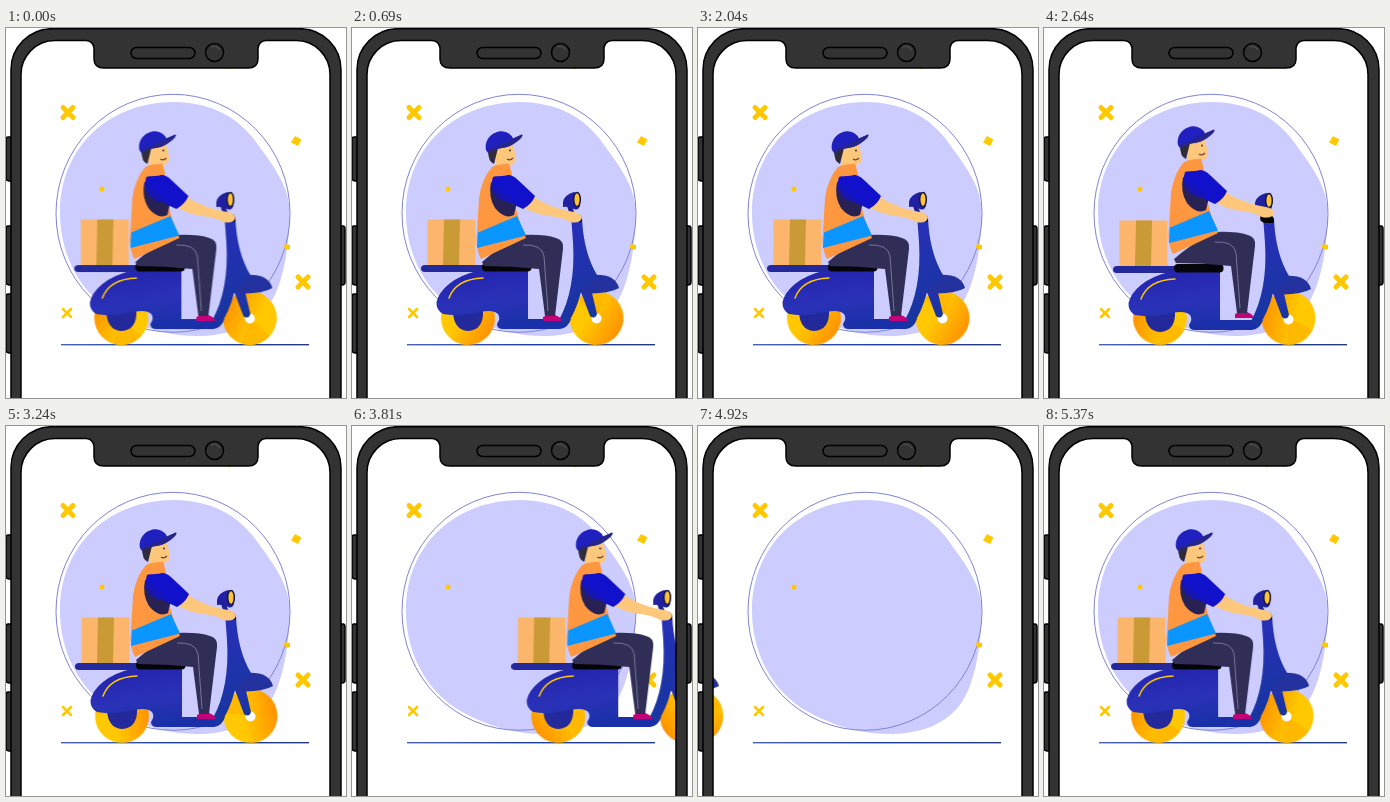
Write an HTML page that moves like this. It is 340 px wide and 370 px high and loops after 5400 ms.

```html
<!DOCTYPE html>
<html lang="en">
<head>
<meta charset="utf-8">
<title>Scooter delivery</title>
<style>
html, body { margin: 0; width: 100%; height: 100%; overflow: hidden; background: #fff; }
svg { display: block; width: 100vw; height: 100vh; }
#scooter { animation: drive 5400ms infinite; }
#bike { --hop: 1px; }
#rider { --hop: -5px; }
#legs { --hop: -3px; }
#bike, #rider, #legs { animation: hop 5400ms ease-in-out infinite; }
.wheel { transform-box: fill-box; transform-origin: center; animation: spin 1350ms linear infinite; }

@keyframes drive {
  0% { transform: translateX(-.7px); animation-timing-function: ease-out; }
  1.2%, 64.81% { transform: translateX(0); animation-timing-function: ease-in-out; }
  79.17% { transform: translateX(270px); animation-timing-function: step-end; }
  88.8% { transform: translateX(-270px); animation-timing-function: ease-in-out; }
  100% { transform: translateX(-.7px); }
}
@keyframes hop {
  0%, 9.3%, 22.22%, 31.52%, 44.44%, 53.74%, 100% { transform: none; }
  4.63%, 26.85%, 49.07% { transform: translateY(var(--hop)); }
}
@keyframes spin { to { transform: rotate(360deg); } }
</style>
</head>
<body>
<svg viewBox="0 0 340 370" preserveAspectRatio="none">
  <defs>
    <clipPath id="screen"><rect x="15" y="12" width="309" height="358"/></clipPath>
    <linearGradient id="tire" x1="0" y1=".2" x2="1" y2=".7">
      <stop offset=".1" stop-color="#ff9500"/><stop offset=".65" stop-color="#ffc800"/>
    </linearGradient>
    <linearGradient id="paint" x1="0" y1="0" x2=".35" y2="1">
      <stop offset=".2" stop-color="#2527b0"/><stop offset=".6" stop-color="#2a32b8"/><stop offset="1" stop-color="#1a30a8"/>
    </linearGradient>
    <linearGradient id="front" x1="0" y1="0" x2=".2" y2="1">
      <stop offset="0" stop-color="#2a2ebc"/><stop offset="1" stop-color="#17369f"/>
    </linearGradient>
    <linearGradient id="sleeve" x1=".8" y1=".3" x2="0" y2="1">
      <stop offset=".45" stop-color="#1111cc"/><stop offset="1" stop-color="#25205f"/>
    </linearGradient>
    <linearGradient id="ground">
      <stop offset="0" stop-color="#4b62b2"/><stop offset=".5" stop-color="#193caa"/><stop offset="1" stop-color="#26397d"/>
    </linearGradient>
    <path id="cross" d="M-5-5 5 5M5-5-5 5" stroke="#ffc800" stroke-linecap="round"/>
    <g id="rim">
      <circle r="27" fill="url(#tire)"/>
      <path d="M0 0 20 18A27 27 0 0 1-8 25.8Z" fill="#ffb000" opacity=".6"/>
    </g>
  </defs>

  <rect width="340" height="370" fill="#fff"/>
  <path d="M54 185C54 118 104 74 168 74C205 74 233 90 250 114C265 135 282 156 283.500 180C284 207 280 251 264 276C247 301 218 308 190 308C160 308 127 297 102 281C70 259 54 222 54 185Z" fill="#ccccff"/>
  <ellipse cx="167" cy="185.300" rx="117" ry="119" fill="none" stroke="#7f84d6"/>

  <g fill="#ffc800">
    <use href="#cross" x="62" y="84.500" stroke-width="5"/>
    <use href="#cross" transform="translate(61 285) scale(.8)" stroke-width="3.200"/>
    <use href="#cross" x="297" y="254" stroke-width="5"/>
    <path d="M289 108 295.500 111.500 292 118 285 114.500Z"/>
    <circle cx="96" cy="161" r="2.500"/>
    <path d="M279 216 284 217 284 221 280 222 277.500 219Z"/>
    <circle cx="223" cy="38.500" r="2.500"/>
  </g>
  <rect x="55" y="316" width="248" height="1.400" fill="url(#ground)"/>

  <g clip-path="url(#screen)">
    <g id="scooter">
      <g transform="translate(116 290)"><g class="wheel"><use href="#rim"/></g></g>
      <g transform="translate(244.500 290)"><g class="wheel"><use href="#rim"/></g></g>

      <g id="bike">
        <path d="M75.500 191.500H123.500V238H75.500Z" fill="#fcb66b"/>
        <path d="M92 191.500H108L107 238H91Z" fill="#c99a35"/>
        <circle cx="244.500" cy="290.500" r="5" fill="#fff"/>
        <path d="M226 256 237 252 245 286Q243 292 238 288Z" fill="url(#front)"/>
        <path d="M101 282H131Q132 302 116 303Q101 302 101 282Z" fill="#23289a"/>
        <path d="M73 237H176V244H73Q69 244 69 240.500Q69 237 73 237Z" fill="#23289a"/>
        <path d="M125 243H176V291H211L219 291Q216 300 208 301H151Q145 301 145 296Q149 290 146 286Q141 281 128 284Q107 289 91 286Q84 282 84.500 274Q87 264 97 256Q108 247 125 243Z" fill="url(#paint)"/>
        <path d="M97 270Q104 251 131 250" fill="none" stroke="#ffc800" stroke-width="1.500" stroke-linecap="round"/>
        <rect x="130" y="235" width="49.500" height="8.500" rx="4" fill="#050509"/>
        <path d="M239 247Q263 245 267 260Q255 267 228 265Z" fill="#24329f"/>
        <path d="M219 187 230 190C231 213 236 232 245 247Q236 256 229 264Q224 284 214 298L207 292C218 272 223 246 221 214Z" fill="url(#front)"/>
        <path d="M214 175 220 178 224 190 218 187Z" fill="#20208f"/>
        <path d="M211 174Q212 167 222 164Q230 166 228 178Q226 183 222 181Q216 178 211 179Z" fill="#2020a0"/>
        <ellipse cx="225" cy="171.500" rx="3.300" ry="7" fill="#ffc536" stroke="#161643" stroke-width="1.500"/>
        <path d="M217 186 227 186Q232 190 229 194L220 194Q214 191 217 186Z" fill="#050509"/>
      </g>

      <g id="legs">
        <path d="M191 289Q198 285 203 287Q209 289 210 293H191Z" fill="#c20078"/>
        <path d="M130 234Q144 221 170 207Q193 206 204 210Q212 212 211 221L203 288H193L187 241Q160 238 132 238Z" fill="#302e57"/>
        <path d="M171 217Q190 216 192 228L196 283" fill="none" stroke="#8589a8" stroke-width=".8"/>
      </g>

      <g id="rider">
        <path d="M142 121 161 116 164 130Q163 138 156 137L157 144 144 143Z" fill="#fdc87c"/>
        <path d="M136 122 146 120 144 128 142 136Q136 134 136 122Z" fill="#302b3c"/>
        <path d="M134 122C132 111 141 103.300 150 103.300Q158 104 161 110.500L170 106.500Q172 108 165 113.500Q158 119 150 120Q141 121 136 125Z" fill="#2020be"/>
        <path d="M136 122Q150 117 161 110.500L170 106.500Q172 108 165 113.500Q158 119 150 120Q141 121 136 125Z" fill="#25258a"/>
        <path d="M155 131Q158 133 161 130" fill="none" stroke="#713d37" stroke-width="1.200"/>
        <circle cx="158" cy="122.500" r=".9" fill="#302b3c"/>
        <path d="M140 139Q149 135 157 137L160 149Q160 177 174 210L129 231Q123 219 125 205L127 170Q130 150 140 139Z" fill="#ff9640"/>
        <path d="M126 204.500 165 188 174 207.500 125 220Z" fill="#0b96ff"/>
        <path d="M139 154Q136 169 143 180Q153 192 162 187L165 174Z" fill="#282153"/>
        <path d="M169 178 181 168Q195 179 222 184Q229 185 230 190Q228 196 218 194Q209 189 197 188Q182 186 169 178Z" fill="#fdc87c"/>
        <path d="M141 149Q157 143 166 152L183 168Q180 176 171 181L156 174Q142 173 139 157Z" fill="url(#sleeve)"/>
        <path d="M142 138 157 135.500 160 146Q150 149 142 148Z" fill="#ff9640"/>
      </g>
    </g>
  </g>

  <g fill="#333" stroke="#000" stroke-width="1.500">
    <path d="M6 109H2Q0 109 0 111V150Q0 153 3 153H6M6 198H2Q0 198 0 201V254Q0 257 3 257H6M6 266H2Q0 266 0 269V322Q0 325 3 325H6M334 198H337Q339 198 339 201V254Q339 257 336 257H334"/>
    <path d="M5 372V42A41 41 0 0 1 46 .7H294A41 41 0 0 1 335 42V372H324V47A34 34 0 0 0 290 12.500H260Q253 13 252 20V31Q252 40 242 40H98Q88 40 88 31V20Q87 13 80 12.500H49A34 34 0 0 0 15 47V372Z"/>
    <rect x="125" y="19.500" width="64" height="11" rx="5.500"/>
    <circle cx="208.500" cy="24.500" r="9"/>
    <path d="M205 19Q210 17 214 22" fill="none" stroke="#555" stroke-width="1"/>
  </g>
</svg>
</body>
</html>
```
